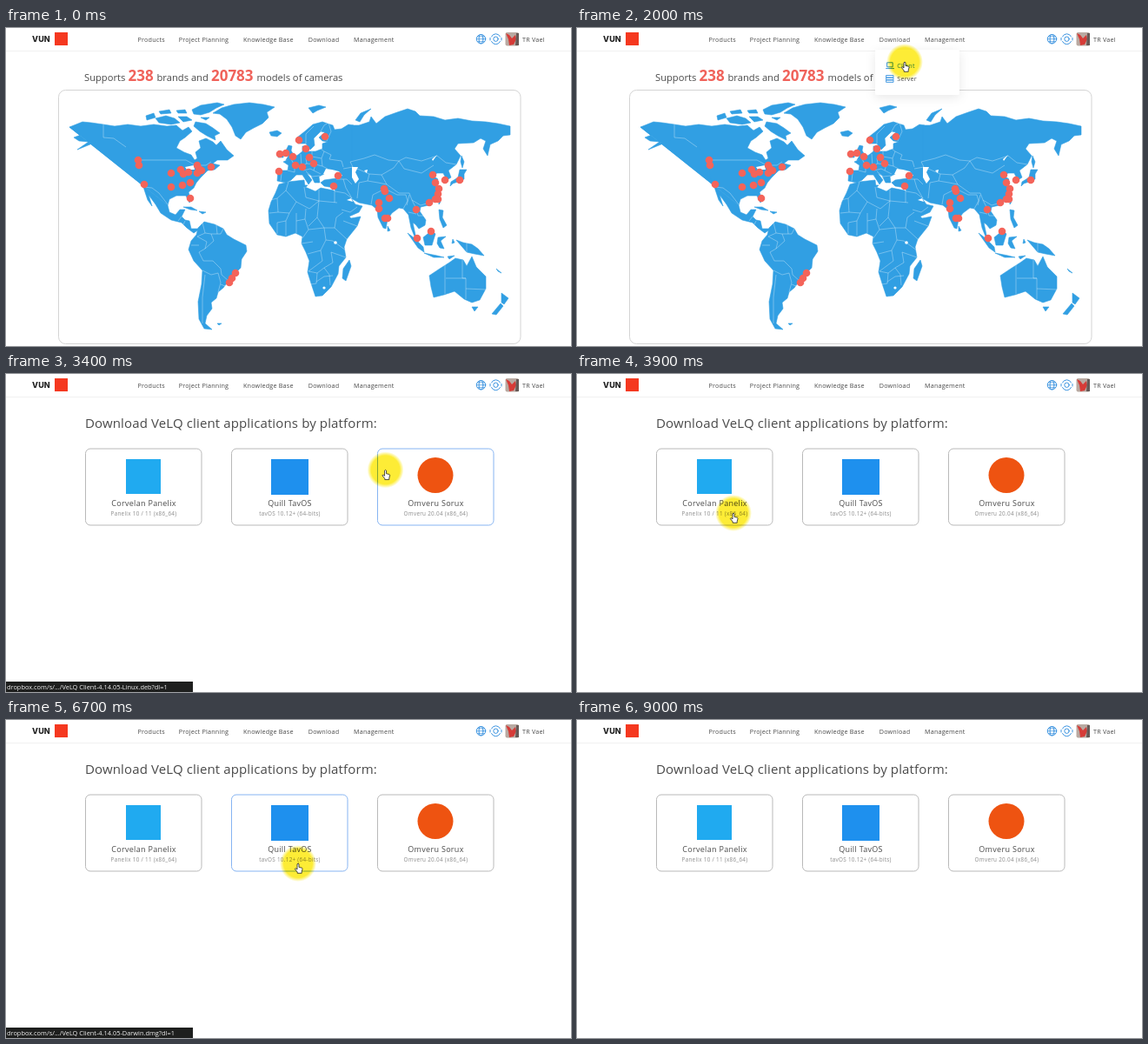
These frames come from a looping animation (650x366 px, 9.6 s). An HTML page:

```html
<!DOCTYPE html>
<html lang="en">
<head>
<meta charset="utf-8">
<title>Client download</title>
<style>
html, body { margin: 0; width: 100%; height: 100%; overflow: hidden; background: #fff; }
svg { display: block; width: 100vw; height: 100vh; }
text { font-family: "Open Sans", "Noto Sans", sans-serif; fill: #4a4a4a; white-space: pre; }
.nav text, .item { font-size: 7.2px; letter-spacing: .2px; }
.lead { font-size: 11.2px; }
.num { font-size: 17px; font-weight: 700; fill: #f0625a; }
.head { font-size: 15px; letter-spacing: .13px; }
.name { font-size: 9px; letter-spacing: .3px; text-anchor: middle; }
.sub { font-size: 6.3px; letter-spacing: .3px; text-anchor: middle; fill: #8a8a8a; }
.land { fill: #319fe3; stroke: #319fe3; stroke-width: .6; stroke-linejoin: round; }
.sea { fill: #fff; }
.border { fill: none; stroke: #fff; stroke-opacity: .55; stroke-width: .6; stroke-linejoin: round; }
.line { fill: none; stroke: #3a93e0; stroke-width: 1; stroke-linecap: round; stroke-linejoin: round; }
.card { fill: #fff; stroke: #b9b9b9; }
.card.on { stroke: #86b4f2; }
#glow { mix-blend-mode: multiply; }
</style>
</head>
<body>
<svg viewBox="0 0 650 366">
<defs>
  <radialGradient id="sun">
    <stop offset=".78" stop-color="#fdec36"/>
    <stop offset="1" stop-color="#fdec36" stop-opacity="0"/>
  </radialGradient>
  <filter id="soft" x="-30%" y="-50%" width="160%" height="200%">
    <feDropShadow dx="0" dy="3" stdDeviation="6" flood-color="#000" flood-opacity=".09"/>
  </filter>
</defs>

<g id="mapPage">
  <text class="lead" x="90" y="60.5">Supports</text>
  <text class="num" x="140.5" y="60.5">238</text>
  <text class="lead" x="173.5" y="60.5">brands and</text>
  <text class="num" x="236" y="60.5">20783</text>
  <text class="lead" x="288.5" y="60.5">models of cameras</text>
  <rect x="60.5" y="71.5" width="531.5" height="292" rx="8" fill="#fff" stroke="#d4d4d4"/>

  <g class="land">
    <!-- North America -->
    <path d="M73 114 88 108 98 109 112 111 125 113 140 111 155 113 170 111 185 113 196 112 203 118 210 114 214 119 206 126 200 130 196 138 205 143 213 146 217 152 220 150 218 143 224 138 222 130 230 127 238 131 242 135 247 130 254 140 262 147 255 152 243 152 238 156 246 158 240 163 232 164 228 168 224 172 219 178 216 184 210 189 213 199 211 201 207 193 196 193 188 197 186 204Z"/>
    <path d="M73 114 86 123 78 126 84 130 95 131 82 140 104 131 112 126 126 128 138 132 142 140 148 148 152 158 153 172 158 183 163 198 168 205 164 192 172 203 178 213 190 221 202 224 208 230 216 236 223 231 213 231 211 222 206 221 202 217 206 209 200 209 195 215 188 212 186 204Z"/>
    <!-- Arctic islands and Greenland -->
    <path d="M238 98 248 92 262 88 280 86 296 88 309 91 300 97 302 103 295 110 285 115 276 120 270 128 264 124 260 114 254 105 246 99Z"/>
    <path d="M214 94 224 89 243 86 251 88 242 92 234 97 224 100 216 99ZM218 108 230 110 238 115 246 121 240 124 241 129 231 124 223 119 216 113ZM172 104 184 101 194 104 200 109 190 111 176 109ZM161 101 170 98 172 103 162 106ZM198 102 208 102 214 106 204 108ZM176 96 188 94 190 98 178 99ZM196 95 206 94 208 98 198 98ZM224 103 234 103 230 106Z"/>
    <!-- South America and Caribbean -->
    <path d="M221 230 228 223 240 226 250 231 254 238 262 243 276 250 277 257 271 266 270 276 263 283 256 291 250 299 244 304 242 311 236 316 237 323 231 331 229 340 237 347 228 346 222 335 221 315 225 295 226 279 216 268 210 255 213 245 219 238Z"/>
    <path d="M204 206 213 206 220 210 212 209ZM222 211 230 212 226 214ZM243 340 248 340 245 342Z"/>
    <!-- Africa -->
    <path d="M314 180 325 177 343 175 344 183 356 188 362 184 377 187 380 190 384 200 392 214 397 219 408 217 404 228 392 243 389 252 391 264 383 274 382 283 374 298 364 308 356 309 351 294 347 281 349 268 345 258 340 248 341 240 333 236 322 240 312 238 303 225 302 210 305 200 310 190Z"/>
    <path d="M395 267 397 274 391 291 387 288 388 277Z"/>
    <!-- Europe -->
    <path d="M312 176 313 164 324 164 325 158 319 154 328 150 336 146 341 142 341 136 345 136 346 142 356 142 364 139 364 133 370 131 364 130 360 126 367 120 362 119 354 127 355 135 350 140 345 133 336 133 335 126 345 118 353 111 364 108 376 112 378 117 386 116 394 111 400 112 400 186 378 184 366 182 362 178 366 175 380 173 380 167 372 164 366 168 360 171 361 178 355 178 351 170 346 167 352 175 348 180 341 169 334 169 328 175 322 178Z"/>
    <path d="M325 135 329 136 328 141 332 148 329 151 322 152 325 147 322 141ZM314 143 320 142 319 149 313 149ZM303 120 312 118 317 121 312 125 305 124ZM348 92 360 89 368 91 358 95 353 98ZM402 106 408 98 420 93 412 100 407 108ZM340 181 347 181 345 183Z"/>
    <!-- Asia -->
    <path d="M398 112 406 112 418 108 420 102 426 110 436 102 450 97 462 93 471 96 476 101 492 102 505 106 520 104 536 107 552 108 566 110 580 113 580 123 572 124 566 130 557 134 554 147 549 139 552 130 546 127 538 132 520 133 516 139 523 147 518 157 509 164 512 172 507 175 503 167 496 167 491 170 497 174 494 181 499 190 494 198 486 204 477 206 450 190 398 180Z"/>
    <path d="M477 206 476 211 483 221 482 227 475 231 471 226 468 224 471 238 475 245 470 240 466 230 463 215 457 208 452 207 444 213 439 220 437 231 434 230 428 218 427 209 421 204 406 201 397 196 402 203 410 205 406 212 390 219 386 208 379 193 378 180 398 165 450 180Z"/>
    <!-- Islands of the east -->
    <path d="M524 147 527 154 525 161 523 154ZM522 163 530 163 527 168 527 174 520 177 514 179 511 182 512 177 520 172ZM498 197 500 200 498 203ZM439 228 442 233 439 234ZM498 209 503 210 502 218 507 227 503 230 499 220ZM462 236 470 242 480 252 481 258 474 253ZM480 241 490 233 494 237 490 250 482 250ZM481 259 496 262 504 264 492 264ZM497 241 506 240 500 245 504 254 499 253 496 248ZM518 244 526 247 536 249 543 254 550 262 539 260 530 258 524 251ZM508 263 516 262 510 266ZM514 243 516 247 513 248Z"/>
    <path d="M487 285 499 277 510 270 517 265 526 267 530 274 536 263 541 275 552 286 552 300 545 313 536 316 527 312 516 303 504 307 492 310 489 298ZM536 321 543 321 539 326ZM570 305 578 311 573 318 570 316ZM569 317 572 320 564 330 559 329ZM564 277 570 282 566 280Z"/>
  </g>
  <g class="sea">
    <path d="M365 168 368 162 375 163 383 165 387 170 378 171ZM398 160 405 160 402 166 406 174 402 179 398 172ZM206 160 216 158 217 163 208 163ZM392 198 397 196 399 200Z"/>
    <circle cx="379" cy="247" r="1.8"/><circle cx="366" cy="299" r="1.6"/><path d="M412 164l4-1-1 4zM490 151l6-5-5 7z"/>
  </g>
  <g class="border">
    <path d="M112 111V126L124 127 138 137M152 152H207L218 158 230 158 236 154M158 183 168 184 176 190 186 203M202 217 198 222M206 222 204 226"/>
    <path d="M226 224 229 236 220 240 231 246 229 254 222 258 227 268 238 268 247 277 248 284 256 291M213 250 222 250M226 279 236 284 244 282 247 293 244 304M229 284 226 310 226 340M236 237 247 237 250 231M242 227 243 237M229 236 236 237 239 245 229 254M247 295 252 297"/>
    <path d="M325 177 322 187 312 196 304 198M322 187 334 200 349 208 360 199 360 186M343 183 345 195 360 199M360 199 381 201M378 187 378 201M312 196 313 212 303 213M313 212 326 213 334 200M326 213 322 222 312 224 312 237M322 222 322 239M334 213 334 236M345 208 344 220 334 222M344 220 348 232 341 242M360 199 358 218 348 228M358 218 366 230 378 230 380 218 388 212"/>
    <path d="M348 232 366 230M378 230 392 243M388 222 404 228M366 230 368 244 362 256 347 260M340 248 353 246M368 244 376 245 391 256M362 256 364 268 348 280 358 282 366 276 376 270 374 258 391 264M358 282 357 294 351 295M357 292 366 286 376 285M366 276 372 284 373 296"/>
    <path d="M313 167 317 167 316 176M324 164 332 166 332 158 328 151M332 158 340 159 346 156 356 157 364 159M340 159 339 145M346 156 345 150 352 148 352 142M352 148 363 150 366 142 362 139M345 133 345 122 354 113M362 119 366 112 371 109M371 109 374 119 369 130M356 157 354 164 362 168M342 164 350 162 354 164M366 142 374 146 372 151 386 153 388 160M363 150 364 159 370 162M345 165 352 171 361 170"/>
    <path d="M388 162 399 160 396 154 412 150 424 146 440 152 452 153 460 149 478 153 496 147 506 155 518 157M452 153 446 161 432 169 418 168 404 162M452 153 458 162 478 167 492 158M432 169 438 180 452 190 464 190 467 198 477 204 484 202M418 168 416 176 406 178 404 196M416 176 428 178 438 180M420 203 422 192 434 186M438 186 450 192 460 192 462 199 457 208M464 192 461 204M380 174 392 174 398 180M388 174 391 184 398 196M379 188 390 190 398 196M386 209 396 212 404 206M467 198 472 208 474 216 482 216M463 212 472 214"/>
    <path d="M505 270V306M506 288 529 288 529 312M529 300 552 301M525 267 525 288 529 288M530 244V260"/>
  </g>
  <g id="dots" fill="#f4645a"/>
</g>

<g id="dlPage">
  <text class="head" x="91" y="61.5">Download VeLQ client applications by platform:</text>
  <g id="cards"/>
</g>

<rect width="650" height="26" fill="#fff"/>
<path d="M0 26.5H650" stroke="#f1f1f1"/>
<g class="nav">
  <text x="30" y="16.2" style="font:800 9px Inter,sans-serif;fill:#222">VUN</text>
  <rect x="56" y="5" width="15" height="15" fill="#f5381f"/>
  <text x="151.5" y="15.7">Products</text>
  <text x="198.7" y="15.7">Project Planning</text>
  <text x="273" y="15.7">Knowledge Base</text>
  <text x="347.7" y="15.7">Download</text>
  <text x="400" y="15.7">Management</text>
  <text x="594" y="15.7">TR Vael</text>
</g>
<g class="line">
  <circle cx="546.5" cy="12.7" r="5.2"/>
  <ellipse cx="546.5" cy="12.7" rx="2.4" ry="5.2"/>
  <path d="M541.5 12.7H551.5M542.5 9.8H550.5M542.5 15.6H550.5" stroke-width=".7"/>
  <path d="M558.5 10a5.5 5.5 0 0 1 10 0M558.5 15.5a5.5 5.5 0 0 0 10 0M557 11.5V14M570 11.5V14"/>
  <circle cx="563.5" cy="12.7" r="2.7"/>
</g>
<rect x="574.5" y="5" width="15.5" height="15.5" rx="2" fill="#b9aaa2"/>
<path d="M575 6 579 8 582 12 586 8 587 13 584 19 579 20 578 13Z" fill="#d63b37"/>
<path d="M587 6h3v14h-4z" fill="#665a57"/>

<g id="menu">
  <rect x="343" y="25" width="97" height="52" rx="2" fill="#fff" filter="url(#soft)"/>
  <g class="line">
    <path d="M357 39.8H363.2V44.8H357ZM355.6 46.6H364.6"/>
    <path d="M356 54.5H364V57H356ZM356 57.2H364V59.7H356ZM356 60H364V62.4H356Z" stroke-width=".9"/>
  </g>
  <text id="client" class="item" x="368.3" y="45.6">Client</text>
  <text class="item" x="368.3" y="61.3">Server</text>
</g>

<g id="status">
  <rect y="354" width="215" height="12" fill="#1e1f1e"/>
  <text id="link" x="1" y="363" style="font-size:7.4px;fill:#f2f2f2"></text>
</g>

<circle id="glow" r="21" fill="url(#sun)"/>
<g id="pointer" fill="#fff" stroke="#222" stroke-width=".8" stroke-linejoin="round">
  <path id="arrow" d="M0 0V8.2L1.9 6.5 3.2 9.3 4.6 8.7 3.4 6H6Z"/>
  <path id="hand" d="M-1 .8Q0-.6 1 .8V4.4L4.4 5.2Q5.2 5.5 5 6.5L4.2 9.8V11.3H-.8V10L-3.6 6.6Q-3.4 5.4-2.2 6L-1 7Z"/>
</g>
</svg>

<script>
const LOOP = 9600, STEP = 100;
const $ = id => document.getElementById(id);
const show = (el, on) => el.style.display = on ? '' : 'none';

const DOTS = [
  152,152, 153,158, 159,180, 190,167, 190,183, 201,163, 204,168, 210,166, 203,181,
  212,178, 212,196, 220,158, 220,167, 225,164, 236,160, 222,162, 264,282, 260,288,
  257,293, 315,145, 314,165, 322,144, 330,148, 333,158, 341,160, 337,129, 345,139,
  349,149, 354,156, 367,125, 377,182, 382,170, 429,201, 429,208, 436,188, 435,185,
  441,196, 436,219, 439,219, 473,242, 489,234, 472,209, 487,201, 494,197, 498,185,
  497,191, 497,197, 494,178, 491,169, 505,175, 522,175
];
let marks = '';
for (let i = 0; i < DOTS.length; i += 2)
  marks += `<circle cx="${DOTS[i]}" cy="${DOTS[i + 1]}" r="4.3"/>`;
$('dots').innerHTML = marks;

const CARDS = [
  { x: 91.5, name: 'Corvelan Panelix', sub: 'Panelix 10 / 11 (x86_64)', file: 'win64.msi',
    icon: '<rect x="138" y="98" width="40" height="40" fill="#20aaf0"/>' },
  { x: 259.5, name: 'Quill TavOS', sub: 'tavOS 10.12+ (64-bits)', file: 'Darwin.dmg',
    icon: '<rect x="305" y="98" width="43" height="41" fill="#1e90ee"/>' },
  { x: 427.5, name: 'Omveru Sorux', sub: 'Omveru 20.04 (x86_64)', file: 'Linux.deb',
    icon: '<circle cx="494" cy="116.5" r="20.5" fill="#ee5311"/>' }
];
$('cards').innerHTML = CARDS.map(c => `
  <rect class="card" x="${c.x}" y="86" width="133.5" height="88" rx="5.5"/>${c.icon}
  <text class="name" x="${c.x + 67}" y="151.6">${c.name}</text>
  <text class="sub" x="${c.x + 67}" y="162.6">${c.sub}</text>`).join('');
const boxes = [...document.querySelectorAll('.card')];

// time, x, y of the pointer tip
const PATH = [
  [300, 520, 70], [1000, 366, 14], [1500, 366, 14], [2000, 377, 39], [2400, 378, 40],
  [2900, 476, 41], [3200, 500, 98], [3900, 180, 160], [4300, 168, 147],
  [5000, 168, 147], [5500, 336, 165], [6700, 336, 165], [7300, 497, 158],
  [8400, 497, 158], [8900, 553, 30]
];
// card, from, to
const HOVER = [[2, 3200, 3600], [0, 4000, 5300], [1, 5300, 7000], [2, 7100, 8700]];

const clamp = v => Math.max(0, Math.min(1, v));
const ramp = (t, a, b) => clamp((t - a) / (b - a));

function pointerAt(t) {
  let i = 0;
  while (i < PATH.length - 2 && t >= PATH[i + 1][0]) i++;
  const [a, x0, y0] = PATH[i], [b, x1, y1] = PATH[i + 1];
  const u = ramp(t, a, b), k = u * u * (3 - 2 * u);
  return [x0 + (x1 - x0) * k, y0 + (y1 - y0) * k];
}

function draw(t) {
  const onMap = t < 2500;
  show($('mapPage'), onMap);
  show($('dlPage'), !onMap);

  const menu = ramp(t, 900, 1200) * (1 - ramp(t, 2900, 3200));
  $('menu').style.opacity = menu;
  $('client').style.fill = t >= 1900 ? '#2f86d8' : '';

  const hover = HOVER.find(([, a, b]) => t >= a && t < b);
  boxes.forEach((box, i) => box.classList.toggle('on', !!hover && hover[0] === i));
  show($('status'), hover);
  if (hover)
    $('link').textContent = `dropbox.com/s/.../VeLQ Client-4.14.05-${CARDS[hover[0]].file}?dl=1`;

  const [x, y] = pointerAt(t), visible = t >= 300 && t < 9000;
  const overNav = x > 347 && x < 385 && y > 7 && y < 20;
  const overMenu = menu > 0 && x > 343 && x < 440 && y > 25 && y < 77;
  const overCard = !onMap && y > 86 && y < 174 && CARDS.some(c => x > c.x && x < c.x + 133.5);
  const link = overNav || overMenu || overCard;
  for (const id of ['glow', 'pointer']) {
    show($(id), visible);
    $(id).setAttribute('transform', `translate(${x} ${y})`);
  }
  show($('hand'), link);
  show($('arrow'), !link);
}

function tick() {
  const t = performance.now() % LOOP;
  draw(Math.floor(t / STEP) * STEP);
  requestAnimationFrame(tick);
}
tick();
</script>
</body>
</html>
```
